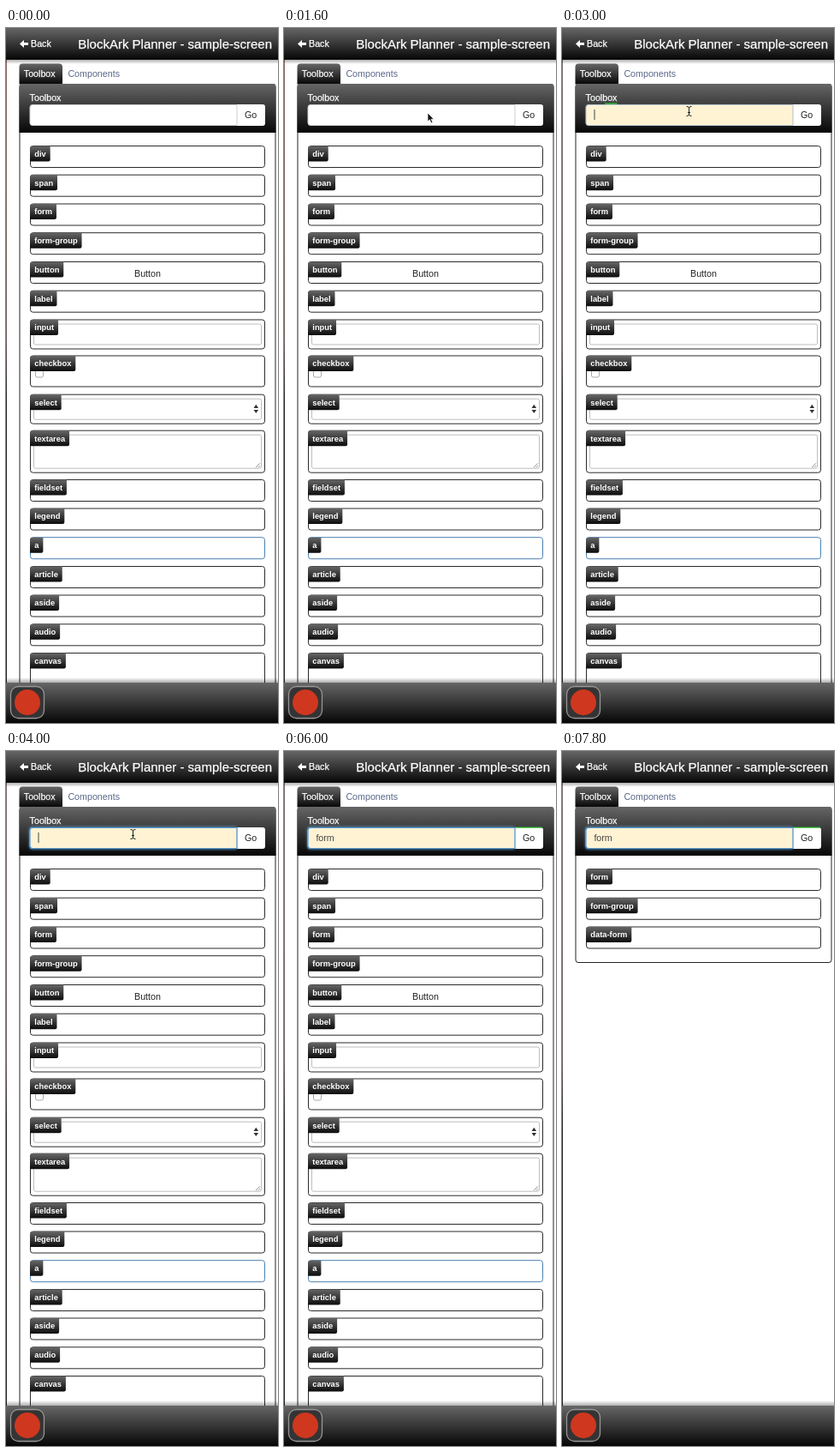
An HTML page that plays this animation: 318 by 810 pixels, repeating every 8000 ms.

```html
<!DOCTYPE html>
<html lang="en">
<head>
<meta charset="utf-8">
<title>Toolbox filter</title>
<style>
  html, body { margin: 0; width: 100%; height: 100%; overflow: hidden; background: #fff; }
  svg { display: block; width: 318px; height: 810px; font: 10.7px "Liberation Sans", Arial, sans-serif; }
  .tag { font-size: 9.35px; font-weight: bold; fill: #fff; }
  .strong { fill: #fff; stroke: #fff; stroke-width: .25px; }
</style>
</head>
<body>
<svg id="stage" viewBox="0 0 318 810">
  <defs>
    <linearGradient id="bar" x2="0" y2="1">
      <stop stop-color="#666"/><stop offset="1" stop-color="#060606"/>
    </linearGradient>
    <linearGradient id="tagFill" x2="0" y2="1">
      <stop stop-color="#666"/><stop offset="1" stop-color="#0c0c0c"/>
    </linearGradient>
    <linearGradient id="shade" x2="0" y2="1">
      <stop stop-color="#000" stop-opacity=".32"/><stop offset="1" stop-color="#000" stop-opacity="0"/>
    </linearGradient>
    <linearGradient id="edgeFill" x2="0" y2="1">
      <stop id="edgeTop" stop-color="#8a6a62"/><stop offset=".45" stop-color="#6a5a58"/>
      <stop offset=".55" stop-color="#222"/>
    </linearGradient>
    <filter id="blur" x="-10%" y="-50%" width="120%" height="200%"><feGaussianBlur stdDeviation="1.8"/></filter>
  </defs>
</svg>
<script>
const stage = document.getElementById('stage');
const LOOP = 8000;

function add(parent, name, attrs, text) {
  const el = document.createElementNS('http://www.w3.org/2000/svg', name);
  for (const key in attrs) el.setAttribute(key, attrs[key]);
  if (text) el.textContent = text;
  parent.appendChild(el);
  return el;
}
const group = (parent = stage) => add(parent, 'g', {});
const rect = (parent, x, y, width, height, fill, more) =>
  add(parent, 'rect', { x, y, width, height, fill, ...more });
const path = (parent, d, fill, more) => add(parent, 'path', { d, fill, ...more });
const label = (parent, x, y, text, more) => add(parent, 'text', { x, y, ...more }, text);
const frame = (parent, x, y, w, h, stroke, rx = 3) =>
  rect(parent, x + .5, y + .5, w - 1, h - 1, '#fff', { stroke, rx });
const show = (el, on) => el.setAttribute('visibility', on ? 'visible' : 'hidden');

function item(parent, name, y, h = 26, stroke = '#2b2b2b', content) {
  frame(parent, 28, y, 275, h, stroke);
  if (content) content(parent, y);
  const tag = path(parent, '', 'url(#tagFill)');
  const text = label(parent, 33.3, y + 12.8, name, { class: 'tag' });
  const w = text.getComputedTextLength() + 10.2;
  tag.setAttribute('d', `M28 ${y + 18.5}v-15q0-3 3-3h${w - 3}v16q0 2-2 2z`);
}

const field = h => (g, y) => frame(g, 32, y + 5, 267, h, '#bdbdbd', 2);

function drawButton(g, y) {
  label(g, 165.5, y + 17.6, 'Button', { 'text-anchor': 'middle', fill: '#222' });
}
function drawCheck(g, y) {
  frame(g, 34, y + 16, 10, 10, '#aaa', 2);
}
function drawSelect(g, y) {
  field(25)(g, y);
  path(g, `M289.5 ${y + 16.2}l2.8-4.2 2.8 4.2zm0 2l2.8 4.2 2.8-4.2z`, '#333');
}
function drawArea(g, y) {
  field(40)(g, y);
  path(g, `M292 ${y + 43.5}l5-5m-2 5l2-2`, 'none', { stroke: '#777', 'stroke-width': .8 });
}

// Panels: full list and filtered list
const full = group(), filtered = group();
frame(full, 15.5, 65, 300, 715, '#222');
frame(filtered, 15.5, 65, 300, 182, '#222');

[
  ['div', 137], ['span', 170.7], ['form', 204.5], ['form-group', 238.2],
  ['button', 272, 26, , drawButton], ['label', 305.7],
  ['input', 339.5, 35, , field(25)],
  ['checkbox', 381.5, 37, , drawCheck],
  ['select', 426.7, 35, , drawSelect],
  ['textarea', 468.7, 50, , drawArea],
  ['fieldset', 526], ['legend', 559.5], ['a', 593.2, 26, '#4a7fb0'],
  ['article', 627], ['aside', 660.5], ['audio', 694.3], ['canvas', 728, 60]
].forEach(args => item(full, ...args));
['form', 'form-group', 'data-form'].forEach((name, i) => item(filtered, name, 137 + i * 33.75));

// Tabs and search header
path(stage, 'M15.5 65.5v-20q0-4 4-4h42.500q4 0 4 4v20z', 'url(#bar)');
label(stage, 20.8, 57, 'Toolbox', { class: 'strong' });
label(stage, 72.4, 57, 'Components', { fill: '#586788' });
path(stage, 'M15.500 122v-54q0-3 3-3h294q3 0 3 3v54z', 'url(#bar)');
label(stage, 27.6, 84.5, 'Toolbox', { class: 'strong' });

const glow = rect(stage, 27, 88, 244, 27, '#66afe9', { rx: 4, filter: 'url(#blur)' });
path(stage, 'M270 89h30q3 0 3 3v19q0 3-3 3h-30z', '#fff');
label(stage, 279, 105, 'Go', { fill: '#222' });
const shape = 'M270 89.500h-239q-3 0-3 3v18q0 3 3 3h239z';
const box = path(stage, shape, '#fff', { stroke: '#ccc' });
const ring = path(stage, shape, 'none', { stroke: '#559bd5', 'stroke-width': 1.2 });
const typed = label(stage, 37.4, 104.8, '', { fill: '#444' });
const caret = rect(stage, 38, 95, 1, 12, '#444');
const spark = rect(stage, 50, 87.5, 14.5, 1.3, '#2fc832');
const goLine = rect(stage, 270.5, 88.6, 31.5, 1.2, '#2fc832');

// Left edge, title bar and footer
rect(stage, 0, 37, 1, 726, 'url(#edgeFill)');
rect(stage, 0, 0, 318, 37, 'url(#bar)');
rect(stage, 0, 37, 318, 5, 'url(#shade)');
path(stage, 'M16 18.500l5-4.500v2.900h5v3.200h-5v2.900z', '#fff');
label(stage, 29, 22.3, 'Back', { class: 'strong' });
label(stage, 311, 24, 'BlockArk Planner - sample-screen',
  { class: 'strong', 'text-anchor': 'end', 'font-size': 15 });
rect(stage, 0, -763, 318, 6, 'url(#shade)', { transform: 'scale(1 -1)' });
rect(stage, 0, 763, 318, 47, 'url(#bar)');
rect(stage, 5.5, 767.5, 39, 37, '#343434', { rx: 9, stroke: '#969696', 'stroke-width': 1.3 });
add(stage, 'circle', { cx: 25, cy: 786, r: 15, fill: '#d0371f' });

// Pointers, with the hot spot at the origin
const arrow = path(stage, 'M0 0v10l2.300-2.200 1.700 3.900 1.800-.8-1.700-3.700h3.100z', '#111',
  { stroke: '#fff', 'stroke-width': .7 });
const beam = path(stage, 'M-3-5.500q3 0 3 1.500v8q0 1.500-3 1.500M3-5.500q-3 0-3 1.500v8q0 1.500 3 1.500M-1.500 1.500h3',
  'none', { stroke: '#222' });

// Steps: [start ms, ...values]
const pointerSteps = [
  [0], [1000, arrow, 274, 193], [1070, arrow, 264, 182],
  [1270, arrow, 251, 168], [1330, arrow, 230, 149], [1400, arrow, 208, 129],
  [1470, arrow, 190, 113], [1530, arrow, 177, 104], [1600, arrow, 168, 99],
  [1670, arrow, 160, 97], [1730, arrow, 154, 96], [1800, arrow, 149, 96],
  [1870, arrow, 147, 96], [3000, beam, 148.5, 97], [4530, arrow, 192, 120], [4870]
];
const inputSteps = [
  [0, '', false], [3000, '', true], [3530, '', false], [4000, '', true], [4530, '', false],
  [4870, 'f', true], [5130, 'fo', true], [5270, 'for', true], [5470, 'form', true],
  [6000, 'form', false], [6330, 'form', true], [6800, 'form', false],
  [7330, 'form', true], [7800, 'form', false]
];
const focusSteps = [[0, 0], [3000, .15], [3070, .5], [3130, .8], [3200, 1]];
const at = (steps, t) => steps.findLast(step => step[0] <= t).slice(1);

function draw(t) {
  const [pointer, x, y] = at(pointerSteps, t);
  for (const el of [arrow, beam]) show(el, el === pointer);
  if (pointer) pointer.setAttribute('transform', `translate(${x} ${y})`);

  const [text, caretOn] = at(inputSteps, t);
  typed.textContent = text;
  caret.setAttribute('x', text ? 37.4 + typed.getComputedTextLength() : 37.5);
  show(caret, caretOn);

  const [focus] = at(focusSteps, t);
  glow.setAttribute('opacity', focus * .6);
  ring.setAttribute('opacity', focus);
  box.setAttribute('fill', t < 3000 ? '#fff' : '#fff3d4');
  show(spark, t >= 3000 && t < 3070);
  show(goLine, t >= 5130);
  document.getElementById('edgeTop').setAttribute('stop-color', t < 2200 ? '#8a6a62' : '#77696a');

  show(full, t < 6330);
  show(filtered, t >= 6330);
}

const start = performance.now();
function tick() {
  draw((performance.now() - start) % LOOP);
  requestAnimationFrame(tick);
}
tick();
</script>
</body>
</html>
```
